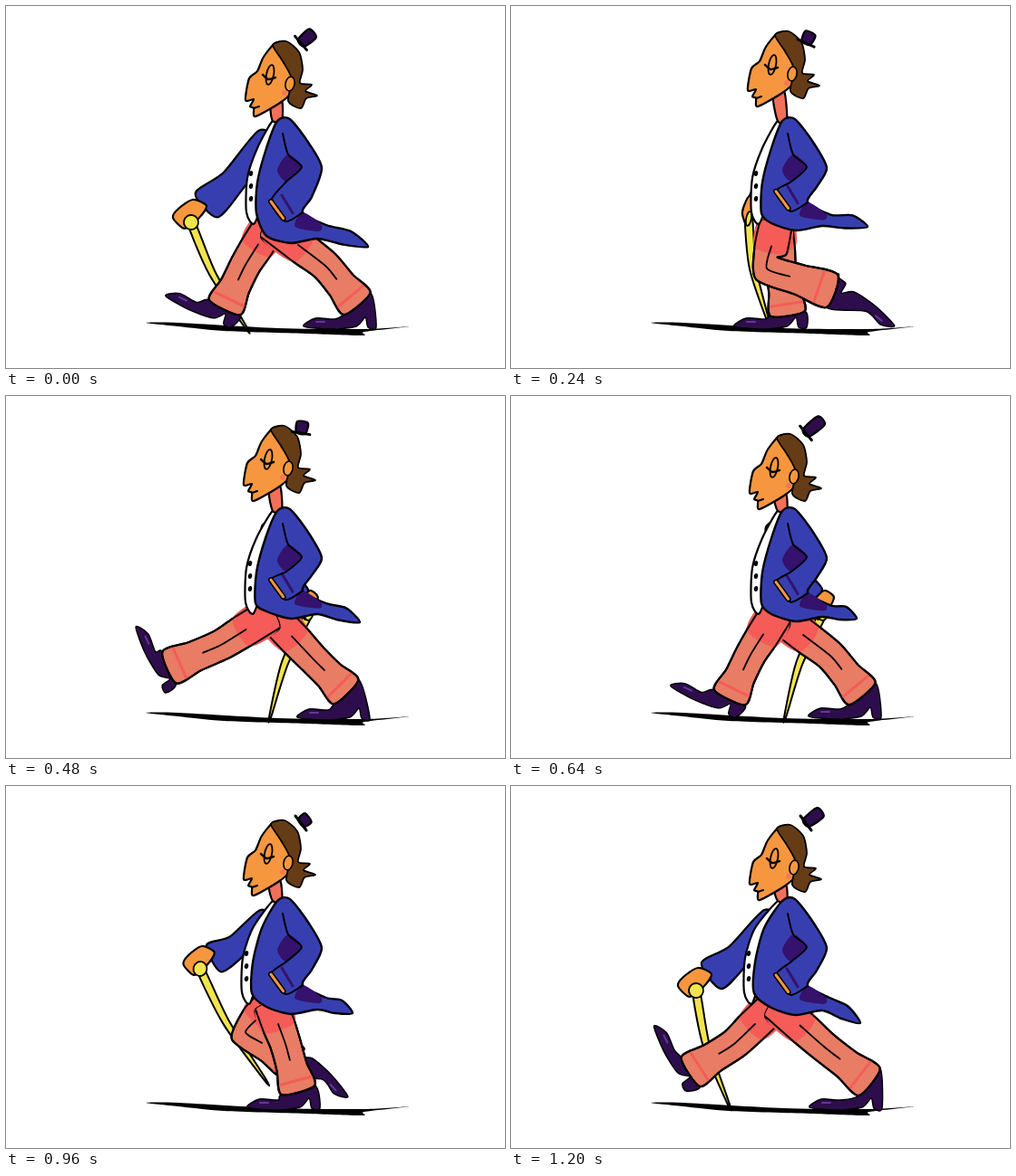
Animation of 550 by 400 pixels, one loop 1.28 s. Source, as an HTML page with a canvas:

```html
<!DOCTYPE html>
<html lang="en">
<head>
<meta charset="utf-8">
<title>Strolling gentleman</title>
<style>
html, body { margin: 0; width: 100%; height: 100%; overflow: hidden; background: #fff; }
canvas { display: block; }
</style>
</head>
<body>
<canvas id="stage" width="550" height="400"></canvas>
<script>
const ctx = document.getElementById('stage').getContext('2d');
const STEP = 80, STEPS = 16;
const SKIN = '#f69740', BLUE = '#373fb0', PURPLE = '#34126e', SHOE = '#2e0d4c',
      PANTS = '#e87c64', RED = '#f55c58', HAIR = '#663c17', YELLOW = '#f1e44e';
const HIP = [292, 241];

// One leg's cycle: step, knee, ankle, heel, direction of the toe in degrees.
// The other leg runs half a loop behind.
const stride = [
  [0, 352, 287, 387, 329, 408, 355, 180],
  [2, 332, 290, 388, 322, 414, 322, 154],
  [3, 282, 290, 354, 315, 362, 301, 40],
  [4, 264, 272, 316, 306, 323, 284, 47],
  [6, 237, 275, 180, 300, 176, 328, 245],
  [7, 246, 285, 198, 316, 193, 337, 243],
  [8, 264, 286, 241, 333, 248, 355, 205],
  [10, 278, 290, 268, 339, 281, 354, 180],
  [11, 297, 288, 305, 340, 326, 355, 180],
  [12, 308, 285, 322, 336, 346, 356, 180],
  [14, 338, 290, 375, 327, 401, 356, 180],
  [15, 345, 288, 395, 327, 409, 356, 180]
];
// Upper body: step, head offset, hat top, lean, hem height, coat tail, cane knob, cane tip.
const sway = [
  [0, 2, 1, 338, 30, 2, 262, 399, 266, 204, 239, 265, 356],
  [3, -1, -10, 330, 30, 2, 248, 393, 244, 262, 235, 284, 350],
  [6, 0, -5, 327, 29, 1, 246, 390, 250, 334, 240, 291, 355],
  [8, 1, 4, 342, 27, 2, 249, 381, 246, 344, 240, 302, 355],
  [10, 0, 8, 335, 26, 2, 254, 375, 255, 267, 241, 308, 355],
  [12, 0, 0, 333, 35, -3, 252, 382, 251, 214, 202, 286, 325],
  [15, 1, 5, 341, 29, -6, 253, 385, 262, 204, 226, 240, 352]
];

const pairs = flat => flat.flatMap((x, i) => i % 2 ? [] : [[x, flat[i + 1]]]);
const mix = (a, b, u) => a.map((v, i) => v + (b[i] - v) * u);
const shift = (p, dx, dy) => [p[0] + dx, p[1] + dy];

const ground = pairs([154, 350, 190, 350, 300, 356, 395, 357, 445, 354, 395, 360, 393, 364, 330, 362, 240, 359, 190, 354]);
const face = pairs([295, 40, 282, 55, 275, 71, 266, 79, 262, 103, 271, 102, 267, 110, 271, 112, 273, 121, 300, 106, 313, 94, 317, 75, 308, 42]);
const hair = pairs([292, 42, 307, 38, 321, 50, 325, 69, 322, 84, 335, 86, 328, 93, 341, 98, 329, 101, 323, 112, 309, 104, 313, 80, 303, 60]);

function sample(keys, step) {
  const i = keys.findLastIndex(k => k[0] <= step);
  const a = keys[i], b = keys[i + 1] || [STEPS, ...keys[0].slice(1)];
  return mix(a, b, (step - a[0]) / (b[0] - a[0])).slice(1);
}

// Outline of a tube through the joints: along its front, back along its rear
function limb(joints, halves) {
  const last = joints.length - 1;
  const side = sign => joints.map((p, i) => {
    const a = joints[Math.max(i - 1, 0)], b = joints[Math.min(i + 1, last)];
    const dx = b[0] - a[0], dy = b[1] - a[1], k = sign * halves[i] / Math.hypot(dx, dy);
    return shift(p, -dy * k, dx * k);
  });
  return [...side(1), ...side(-1).reverse()];
}

// Gently rounded path through the points
function trace(pts, closed) {
  const n = pts.length, k = 0.13;
  const at = i => closed ? pts[(i + n) % n] : pts[Math.max(0, Math.min(n - 1, i))];
  ctx.beginPath();
  ctx.moveTo(...pts[0]);
  for (let i = 0; i < (closed ? n : n - 1); i++) {
    const [p, a, b, q] = [at(i - 1), at(i), at(i + 1), at(i + 2)];
    ctx.bezierCurveTo(a[0] + (b[0] - p[0]) * k, a[1] + (b[1] - p[1]) * k,
                      b[0] - (q[0] - a[0]) * k, b[1] - (q[1] - a[1]) * k, ...b);
  }
  if (closed) ctx.closePath();
}

function ink(color, width) {
  ctx.strokeStyle = color;
  ctx.lineWidth = width;
  ctx.stroke();
}

function paint(fill, width) {
  ctx.fillStyle = fill;
  ctx.fill();
  if (width) ink('#000', width);
}

function shape(pts, fill, width = 2.2) {
  trace(pts, true);
  paint(fill, width);
}

function line(pts, width = 2, color = '#000') {
  trace(pts, false);
  ink(color, width);
}

function oval([x, y], rx, ry, fill, width = 0) {
  ctx.beginPath();
  ctx.ellipse(x, y, rx, ry, 0.2, 0, 7);
  paint(fill, width);
}

function leg(step) {
  const [kx, ky, ax, ay, hx, hy, turn] = sample(stride, step);
  const knee = [kx, ky], ankle = [ax, ay];
  const p = limb([HIP, mix(HIP, knee, 0.6), knee, mix(knee, ankle, 0.5), ankle], [18, 18, 17, 17, 19]);

  const c = Math.cos(turn * Math.PI / 180), s = Math.sin(turn * Math.PI / 180);
  const foot = (along, up) => [hx + c * along - s * up, hy + s * along + c * up];
  shape([foot(80, 1), foot(67, 10), foot(46, 9), p[4], p[5], foot(0, 0),
         foot(9, 0), foot(12, 11), foot(22, 1), foot(50, -2)], SHOE, 1.5);
  line([foot(66, 6), foot(57, 6)], 2, '#65379a');

  shape(p, PANTS);
  shape([p[0], p[1], p[8], p[9]], RED, 0);
  line([mix(p[3], p[4], 0.6), mix(p[6], p[5], 0.6)], 3, RED);
  line(p);
  line([mix(HIP, knee, 0.5), knee, mix(knee, ankle, 0.35)], 1.8);
}

function farArm(knob, tip) {
  const shoulder = [288, 145];
  const reach = Math.min(1, Math.max(0.35, Math.abs(shoulder[0] - knob[0]) / 80));
  const cane = [knob, shift(mix(knob, tip, 0.48), -6, 0), tip];
  shape(limb(cane, [4, 3.6, 1]), YELLOW, 2);
  const elbow = shift(mix(shoulder, knob, 0.45), 0, 6);
  shape(limb([shoulder, elbow, mix(shoulder, knob, 0.8)], [12 * reach, 14 * reach, 18 * reach]), BLUE);
  const palm = pairs([2, -25, 17, -18, 8, -4, -7, 7, -20, -5, -14, -15]);
  shape(palm.map(([x, y]) => shift(knob, x * reach, y)), SKIN);
  oval(knob, 8 * reach, 8, YELLOW, 1.8);
}

function drawHead(dx, dy, hatTop) {
  const move = p => shift(p, dx, dy);
  shape([move([290, 110]), move([302, 104]), [304, 127], [294, 127]], '#f2705a');
  shape(face.map(move), SKIN);
  shape(hair.map(move), HAIR, 1.8);
  const ear = move([311, 85]), eye = move([289, 75]);
  oval(ear, 5, 8, SKIN, 1.6);
  oval(shift(ear, -6, 10), 3, 3, '#f87850');
  oval(eye, 4, 11, SKIN, 1.8);
  line([shift(eye, -8, 0), shift(eye, -2, 5), shift(eye, 6, 3)], 2.4);
  line([move([271, 112]), move([277, 110])]);

  const hat = limb([[325, 41], hatTop], [5, 6]);
  shape(hat, SHOE);
  line([mix(hat[0], hat[3], -0.5), mix(hat[0], hat[3], 1.5)], 3);
}

function drawShirt(lean) {
  const move = p => shift(p, lean, 0);
  shape([[293, 128], ...pairs([275, 157, 264, 190, 263, 228, 272, 240, 284, 200]).map(move), [299, 131]], '#fff');
  for (let y = 185; y < 220; y += 14) oval(move([268, y]), 2.2, 3, '#000');
}

function drawCoat(lean, hem, tail) {
  const drop = (hem - 252) * 0.8;
  const front = pairs([285, 157, 275, 195, 274, 229]).map(p => shift(p, lean, 0));
  const low = [343, hem - 5], seat = [347, 233 + drop];
  const hip = [327, 220 + drop], elbow = [348, 179];
  shape([[299, 127], ...front, [287, hem - 8], [314, hem], low,
         shift(mix(low, tail, 0.5), 0, 2), tail, shift(mix(seat, tail, 0.6), 2, -7), shift(seat, 6, 1),
         hip, [337, 203 + drop], elbow, [334, 152], [313, 125]], BLUE, 2.4);

  const [wrist, pocket] = [[292, 208 + drop], [308, 230 + drop]];
  const arm = [[305, 141], [311, 164], [326, 178], [309, 194], wrist, pocket, hip];
  shape([arm[1], arm[2], arm[3], [299, 181]], PURPLE, 0);
  shape([hip, seat, mix(seat, low, 0.5), mix(pocket, low, 0.3)], PURPLE, 0);
  line([shift(wrist, 12, -7), shift(pocket, 8, -9)], 3, PURPLE);
  line(arm);
  const hand = [wrist, mix(wrist, pocket, 0.85)];
  line(hand, 6);
  line(hand, 3, SKIN);
}

function draw(step) {
  const [dx, dy, hatX, hatY, lean, hem, tailX, tailY, knobX, knobY, tipX, tipY] = sample(sway, step);
  ctx.fillStyle = '#fff';
  ctx.fillRect(0, 0, 550, 400);
  shape(ground, '#000', 0);
  farArm([knobX, knobY], [tipX, tipY]);
  leg((step + STEPS / 2) % STEPS);
  leg(step);
  drawShirt(lean);
  drawHead(dx, dy, [hatX, hatY]);
  drawCoat(lean, hem, [tailX, tailY]);
}

ctx.lineCap = ctx.lineJoin = 'round';
const start = performance.now();
function tick() {
  draw(Math.floor((performance.now() - start) / STEP) % STEPS);
  requestAnimationFrame(tick);
}
tick();
</script>
</body>
</html>
```
